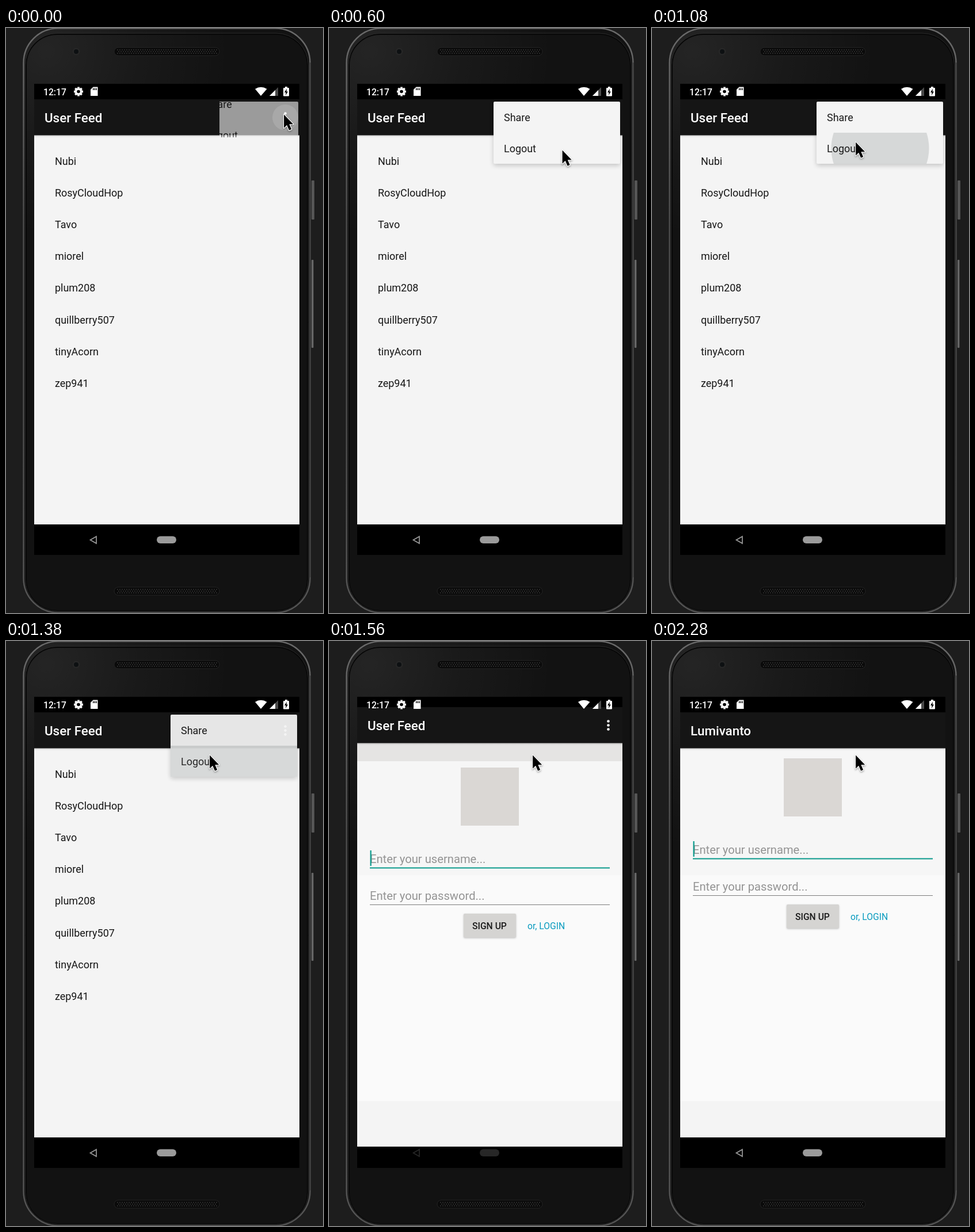
Write an HTML page with a canvas that moves like this. It is 551 px wide and 1017 px high and loops after 2.34 s.

```html
<!DOCTYPE html>
<html lang="en">
<head>
<meta charset="utf-8">
<title>User feed logout</title>
<style>
  html, body { margin: 0; width: 100%; height: 100%; overflow: hidden; background: #1d1d1d; }
  canvas { display: block; width: 551px; height: 1017px; }
</style>
</head>
<body>
<canvas id="stage" width="551" height="1017"></canvas>
<script>
const W = 551, H = 1017, LOOP = 2340, STEP = 60;
const SCREEN = { x: 49, y: 97, w: 461, h: 819 };
const USERS = ['Nubi', 'RosyCloudHop', 'Tavo', 'miorel', 'plum208', 'quillberry507', 'tinyAcorn', 'zep941'];
const APP = 'Lumivanto';

const ctx = document.getElementById('stage').getContext('2d');
const layer = document.createElement('canvas');
layer.width = W;
layer.height = H;
const menuCtx = layer.getContext('2d');

const clamp = v => Math.max(0, Math.min(1, v));
const lerp = (a, b, k) => a + (b - a) * k;
const span = (t, from, length) => clamp((t - from) / length);
const smooth = k => k * k * (3 - 2 * k);

function cubic(a, b, c, d, s) {
  const r = 1 - s;
  return a * r * r * r + 3 * b * r * r * s + 3 * c * r * s * s + d * s * s * s;
}

// Solves x(s) = k on one Bezier segment and returns y(s).
function bezier(k, xs, ys) {
  let lo = 0, hi = 1;
  for (let i = 0; i < 24; i++) {
    const mid = (lo + hi) / 2;
    if (cubic(...xs, mid) < k) lo = mid; else hi = mid;
  }
  return cubic(...ys, lo);
}

const slideEase = k => bezier(k, [0, .4, .2, 1], [0, 0, 1, 1]);
const revealEase = k => k < 1 / 6
  ? bezier(k, [0, .05, .1333, 1 / 6], [0, 0, .06, .4])
  : bezier(k, [1 / 6, .2083, .25, 1], [.4, .82, 1, 1]);

function rect(c, x, y, w, h, fill) {
  c.fillStyle = fill;
  c.fillRect(x, y, w, h);
}

function round(c, x, y, w, h, r, fill, stroke, line = 1) {
  c.beginPath();
  c.roundRect(x, y, w, h, r);
  if (fill) { c.fillStyle = fill; c.fill(); }
  if (stroke) { c.strokeStyle = stroke; c.lineWidth = line; c.stroke(); }
}

function disc(c, x, y, r, fill) {
  c.beginPath();
  c.arc(x, y, r, 0, Math.PI * 2);
  c.fillStyle = fill;
  c.fill();
}

function poly(c, points, fill) {
  c.beginPath();
  points.forEach(([x, y]) => c.lineTo(x, y));
  c.closePath();
  if (fill) { c.fillStyle = fill; c.fill(); }
}

function text(c, str, x, y, size, fill, weight = 400) {
  c.font = `${weight} ${size}px Roboto, sans-serif`;
  c.fillStyle = fill;
  c.fillText(str, x, y);
}

function shadow(c, blur, dy, color) {
  c.shadowBlur = blur;
  c.shadowOffsetY = dy;
  c.shadowColor = color;
}

function gradient(g, ...colors) {
  colors.forEach((color, i) => g.addColorStop(i / (colors.length - 1), color));
  return g;
}

function speaker(y) {
  round(ctx, 188, y, 183, 14, 7, '#0a0a0a', '#242424');
  for (let row = 0; row < 3; row++)
    for (let x = 193 + (row % 2) * 2; x < 367; x += 4)
      rect(ctx, x, y + 3 + row * 3, 2, 2, '#292929');
}

function drawPhone() {
  rect(ctx, 0, 0, W, H, '#1d1d1d');
  round(ctx, 531, 265, 5, 68, 1, '#555');
  round(ctx, 531, 403, 3.5, 153, 1, '#666');
  const edge = gradient(ctx.createLinearGradient(0, 0, 0, H), '#6a6a6a', '#4b4b4b', '#4b4b4b', '#555');
  round(ctx, 30.5, .5, 498, 1016, 60, '#121212', edge, 2.5);
  const glow = gradient(ctx.createRadialGradient(70, 40, 0, 70, 40, 320),
    'rgba(255,255,255,.08)', 'rgba(255,255,255,.03)', 'rgba(255,255,255,0)');
  round(ctx, 32, 2, 495, 1013, 58, glow);
  rect(ctx, 528, 60, 2, 895, '#3f3f3f');
  round(ctx, 35, 11, 489, 1002, 54, null, '#080808', 2);
  round(ctx, 33.5, 9, 492, 1005, 56, null, '#292929');
  speaker(34);
  speaker(972);
  disc(ctx, 122, 41, 6.5, '#272727');
  disc(ctx, 122, 41, 4, '#0d1012');
}

function drawStatus() {
  const white = '#fff';
  text(ctx, '12:17', 65, 116.5, 15.7, white, 500);

  ctx.save();
  ctx.translate(126, 110.5);
  for (let i = 0; i < 8; i++) {
    rect(ctx, -1.9, -8, 3.8, 5, white);
    ctx.rotate(Math.PI / 4);
  }
  disc(ctx, 0, 0, 6.2, white);
  disc(ctx, 0, 0, 2.8, '#000');
  ctx.restore();

  poly(ctx, [[147, 107], [151.5, 102.5], [159.5, 102.5], [159.5, 118], [147, 118]], white);
  for (let i = 0; i < 3; i++) rect(ctx, 151 + i * 2.7, 104.5, 1.4, 3.5, '#000');

  ctx.beginPath();
  ctx.moveTo(443, 118);
  ctx.lineTo(433, 106);
  ctx.quadraticCurveTo(443, 99.5, 453.5, 106);
  ctx.closePath();
  ctx.fillStyle = white;
  ctx.fill();

  poly(ctx, [[458, 118], [473, 103], [473, 118]], '#4a4a4a');
  poly(ctx, [[458, 118], [468, 108], [468, 118]], white);

  round(ctx, 482, 104, 10, 14.5, 1, white);
  rect(ctx, 485, 102, 4, 3, white);
  poly(ctx, [[488, 105.5], [484, 112], [486.5, 112], [486, 117], [490, 110.5], [487.5, 110.5]], '#000');
}

function drawNavIcons(color) {
  poly(ctx, [[157, 884], [157, 896], [146.5, 890]]);
  ctx.strokeStyle = color;
  ctx.lineWidth = 1.7;
  ctx.stroke();
  round(ctx, 262, 883.5, 34, 12.5, 6.25, color);
}

function drawHeader(title) {
  const shade = gradient(ctx.createLinearGradient(0, 186, 0, 190), 'rgba(0,0,0,.16)', 'rgba(0,0,0,0)');
  rect(ctx, 49, 186, 461, 4, shade);
  rect(ctx, 49, 124, 461, 62.5, '#151515');
  text(ctx, title, 67, 164, 22.4, '#fff', 500);
}

function drawFeed(t) {
  const leaving = t >= 1440;
  rect(ctx, 49, 186, 461, 677, leaving ? '#e5e4e3' : '#f4f4f4');
  drawHeader('User Feed');
  USERS.forEach((name, i) => {
    text(ctx, name, 85, 238 + i * 55.1, 17.95, '#161616');
    if (leaving) rect(ctx, 67, 258 + i * 55, 425, 1.3, '#c8c7c5');
  });
  if (t < 300) disc(ctx, 485.5, 155.5, 22.5, `rgba(255,255,255,${.14 * (1 - t / 300)})`);
  for (let i = -1; i < 2; i++) disc(ctx, 485.5, 155.5 + i * 7, 2.3, '#fff');
}

function drawMenu(t) {
  const fade = 1 - span(t, 1370, 156);
  if (!fade) return;
  const q = (1 - span(t, 0, 180)) ** 2;
  const c = menuCtx;
  c.clearRect(0, 0, W, H);
  c.save();
  if (q > 0) {
    c.beginPath();
    c.rect(286 + 85 * q, 128, 220 - 83 * q, 108 - 46 * q);
    c.clip();
  }
  c.save();
  shadow(c, 9, 3, 'rgba(0,0,0,.2)');
  round(c, 286, 128, 220 + 2 * q, 108, 2, '#f4f4f4');
  c.restore();

  if (t >= 1020) {
    c.save();
    c.beginPath();
    c.rect(286, 182, 220, 54);
    c.clip();
    const grow = 1 - (1 - span(t, 1020, 225)) ** 1.4;
    c.globalAlpha = span(t, 1000, 75) * (1 - span(t, 1380, 120));
    disc(c, 396.5, 209, lerp(66, 120, grow), '#d6d8d8');
    c.restore();
  }
  c.translate(43 * q, -23 * q);
  text(c, 'Share', 304, 162, 17.95, '#1a1a1a');
  text(c, 'Logout', 304, 216, 17.95, '#1a1a1a');
  c.restore();

  ctx.globalAlpha = fade * (1 - .4 * q);
  ctx.drawImage(layer, 0, 0);
  ctx.globalAlpha = 1;
}

function drawLogin(t, shift) {
  rect(ctx, 49, 97, 461, 310, '#f6f6f6');
  rect(ctx, 49, 407, 461, 393, '#fafafa');
  rect(ctx, 49, 800, 461, 116, '#f4f4f4');
  ctx.save();
  ctx.translate(0, shift);
  rect(ctx, 49, 97, 461, 27, '#000');
  drawHeader(APP);
  rect(ctx, 229, 204, 101, 101, '#dad7d4');

  text(ctx, 'Enter your username...', 71, 370, 20.19, '#949494');
  rect(ctx, 71, 377.5, 417, 2, '#0a9a8b');
  if (t < 1800 || t >= 2280) rect(ctx, 71.5, 348, 2.2, 27, '#0a9a8b');
  text(ctx, 'Enter your password...', 71, 434, 20.19, '#949494');
  rect(ctx, 71, 442, 417, 1, '#7c7c7c');

  ctx.save();
  shadow(ctx, 3, 1, 'rgba(0,0,0,.24)');
  round(ctx, 234, 458, 91, 41.5, 2, '#d5d4d2');
  ctx.restore();
  text(ctx, 'SIGN UP', 249, 484.5, 15.7, '#1c1c1c', 500);
  text(ctx, 'or, LOGIN', 345, 484.5, 15.7, '#089bbf');
  rect(ctx, 49, 863, 461, 60, '#000');
  ctx.restore();
}

function drawCursor(t) {
  const a = smooth(span(t, 60, 500));
  const b = smooth(span(t, 600, 330));
  const x = lerp(lerp(482.5, 405, a), 353.5, b);
  const y = lerp(lerp(150, 212, a), 198, b);
  ctx.save();
  ctx.translate(x + .6, y + .6);
  ctx.scale(.96, .96);
  poly(ctx, [[0, 0], [0, 24], [5.3, 19], [9.4, 28.3], [13.6, 26.5], [9.6, 17.4], [16.8, 17.4]]);
  ctx.lineJoin = 'round';
  ctx.lineWidth = 2.6;
  ctx.strokeStyle = '#fff';
  shadow(ctx, 3, 1.5, 'rgba(0,0,0,.35)');
  ctx.stroke();
  ctx.shadowColor = 'transparent';
  ctx.fillStyle = '#000';
  ctx.fill();
  ctx.restore();
}

function drawScreen(t) {
  const slide = slideEase(span(t, 1424, 380));
  const reveal = revealEase(span(t, 1414.5, 425));
  const shift = Math.floor(33.6 * (1 - slide));

  ctx.save();
  ctx.beginPath();
  ctx.rect(SCREEN.x, SCREEN.y, SCREEN.w, SCREEN.h);
  ctx.clip();
  rect(ctx, SCREEN.x, SCREEN.y, SCREEN.w, SCREEN.h, '#000');

  if (t < 1740) {
    ctx.save();
    ctx.translate(0, Math.round(-16.4 * slide));
    drawFeed(t);
    drawMenu(t);
    ctx.restore();
  }
  if (t >= 1440) {
    const top = 97 + shift + 786 * (1 - reveal);
    ctx.save();
    ctx.beginPath();
    ctx.rect(SCREEN.x, Math.round(top), SCREEN.w, H);
    ctx.clip();
    drawLogin(t, shift);
    ctx.restore();
  }
  drawStatus();
  drawNavIcons(t >= 1440 && shift > 2 ? 'rgba(155,155,155,.25)' : '#9b9b9b');
  ctx.restore();
}

function frame(now) {
  const t = Math.floor((now % LOOP) / STEP) * STEP;
  drawPhone();
  drawScreen(t);
  drawCursor(t);
  requestAnimationFrame(frame);
}
frame(0);
</script>
</body>
</html>
```
